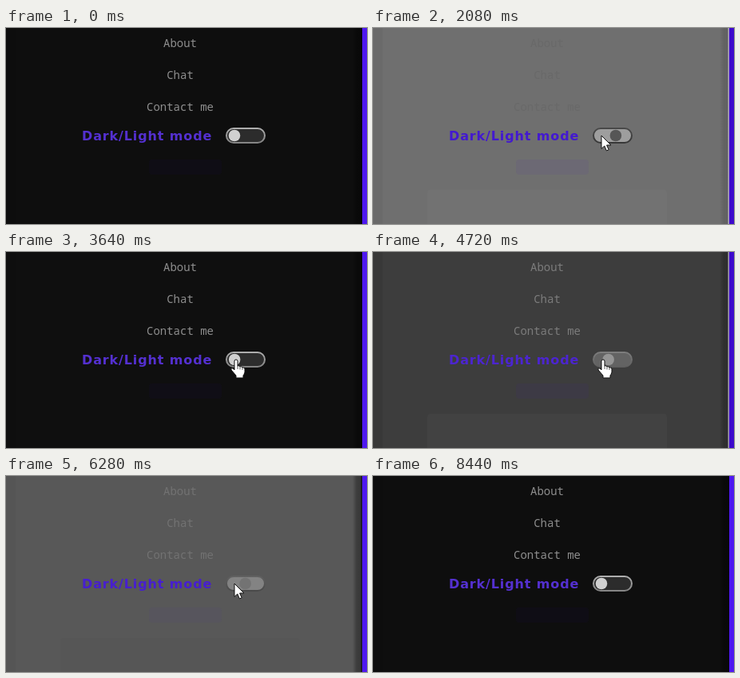
An HTML page for the animation above (8.6 s loop, 452x246 px).

```html
<!DOCTYPE html>
<html lang="en">
<head>
<meta charset="utf-8">
<title>Theme switch</title>
<style>
  html, body { margin: 0; width: 100%; height: 100%; overflow: hidden; background: #0e0e0e; }
  svg { display: block; width: 452px; height: 246px; }
  .menu { font: 14px "Noto Sans Mono", monospace; text-anchor: middle; }
  .title { font: bold 16px "DejaVu Sans", sans-serif; letter-spacing: .87px; }
</style>
</head>
<body>
<svg viewBox="0 0 452 246">
  <defs>
    <linearGradient id="rim" x1="0" y1="0" x2="0" y2="1">
      <stop id="rimTop" offset="0"/>
      <stop id="rimBottom" offset="1"/>
    </linearGradient>
    <linearGradient id="shade">
      <stop offset="0" stop-opacity="0"/>
      <stop offset=".4" stop-opacity=".3"/>
      <stop offset="1" stop-opacity=".4"/>
    </linearGradient>
  </defs>
  <rect id="back" width="452" height="246"/>
  <rect id="leftEdge" width="12" height="246" fill="#000"/>
  <rect id="panel" x="68" y="203" width="300" height="50" rx="4"/>
  <rect id="pill" x="179" y="165" width="91" height="19" rx="4" fill="#4010c0"/>
  <rect id="strip" x="434" width="12" height="246" fill="url(#shade)"/>
  <rect id="line" x="444.5" width="1.5" height="246"/>
  <rect id="bar" x="446" width="6" height="246"/>
  <g id="menu" class="menu">
    <text x="218" y="24">About</text>
    <text x="218" y="64">Chat</text>
    <text x="218" y="104">Contact me</text>
  </g>
  <text id="title" class="title" x="95" y="141">Dark/Light mode</text>
  <rect id="track" x="276" y="126" width="48" height="18" rx="9" stroke="url(#rim)" stroke-width="2"/>
  <circle id="knob" cy="135" r="7.3"/>
  <g id="cursor">
    <path id="arrow" d="M0 0V16.5L3.8 13L6.4 19L9.2 17.8L6.6 12H12Z" fill="#fff" stroke="#111" stroke-width="1"/>
    <path id="hand" d="M0 2Q0 0 2 0T4 2V8Q6 7 7 9Q9 8 10 10Q13 9 13 12V16Q12 19 11 20V23H2V20L-4 13Q-5 10 -2 11L0 13Z" fill="#fff" stroke="#111" stroke-width="1"/>
    <path id="fingers" d="M4 8V12M7 9V12.5M10 10V13" stroke="#333" stroke-width=".8" fill="none"/>
  </g>
</svg>
<script>
const LOOP = 8600, FADE = 700;
const CLICKS = [1665, 2972, 4462, 5925];
const ENTER = [40, 620], LEAVE = [6720, 6850];
const el = id => document.getElementById(id);
const set = (id, attrs) => {
  for (const [key, value] of Object.entries(attrs)) el(id).setAttribute(key, value);
};
const clamp = v => Math.min(1, Math.max(0, v));
const smooth = v => v * v * (3 - 2 * v);
const lerp = (a, b, p) => a + (b - a) * p;
const blend = (a, b, p) => `rgb(${a.map((v, i) => Math.round(lerp(v, b[i], p)))})`;
const gray = (a, b, p) => blend([a, a, a], [b, b, b], p);
const span = (t, [from, to]) => clamp((t - from) / (to - from));

function themeAt(t) {
  const clicks = CLICKS.filter(c => c <= t);
  const light = clicks.length % 2 === 1;
  const done = clicks.length ? smooth(clamp((t - clicks.at(-1)) / FADE)) : 1;
  return { light, p: light ? done : 1 - done };
}

function drawTheme({ light, p }) {
  set('back', { fill: gray(14, 166, p) });
  set('menu', { fill: gray(142, 84, p) });
  set('title', { fill: blend([84, 48, 208], [58, 12, 208], p) });
  set('track', { fill: gray(44, 222, p) });
  set('rimTop', { 'stop-color': gray(174, 16, p) });
  set('rimBottom', { 'stop-color': gray(132, 12, p) });
  set('knob', { fill: gray(208, 17, p), cx: lerp(286, 314, p) });

  // The page behind the menu switches at once.
  set('bar', { fill: light ? '#3d0acc' : '#4e18f0' });
  set('line', { fill: light ? '#c4bcd4' : '#080410', opacity: light ? .8 : .6 });
  set('strip', { opacity: light ? 1 - p : 1 });
  set('leftEdge', { opacity: light ? .12 * (1 - p) : .04 });
  set('panel', { fill: light ? '#fff' : '#000', opacity: light ? .025 : .05 * p });
  set('pill', { opacity: light ? .06 : .04 });
}

function drawCursor(t, p) {
  const arrive = 1 - (1 - span(t, ENTER)) ** 2.5;
  const leave = span(t, LEAVE) ** 1.5;
  const x = lerp(264, 286, arrive) - 14 * leave;
  const y = lerp(250, 135, arrive) + 34 * leave;
  const onKnob = p < .36 && Math.hypot(x - 286, y - 135) < 8;
  set('cursor', {
    transform: `translate(${x} ${y})`,
    visibility: t >= ENTER[0] && t < LEAVE[1] ? 'visible' : 'hidden'
  });
  set('arrow', { opacity: onKnob ? 0 : 1 });
  set('hand', { opacity: onKnob ? 1 : 0 });
  set('fingers', { opacity: onKnob ? 1 : 0 });
}

const start = performance.now();
function frame() {
  const t = (performance.now() - start) % LOOP;
  const theme = themeAt(t);
  drawTheme(theme);
  drawCursor(t, theme.p);
  requestAnimationFrame(frame);
}
frame();
</script>
</body>
</html>
```
